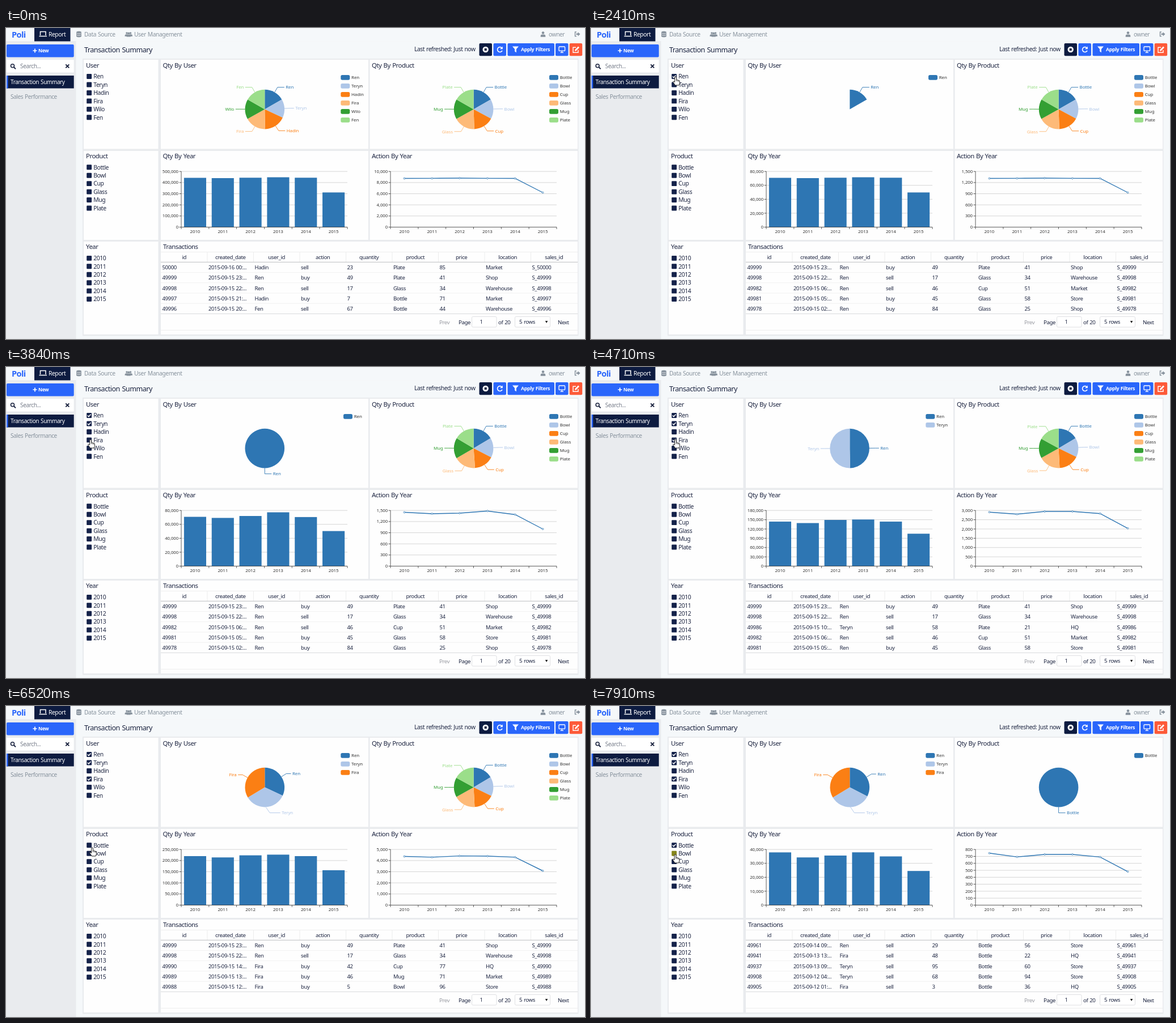
An HTML page that plays this animation: 1021x549 px, repeating every 8000 ms.

```html
<!DOCTYPE html>
<html lang="en">
<head>
<meta charset="utf-8">
<title>Transaction Summary</title>
<style>
html, body { margin: 0; width: 100%; height: 100%; overflow: hidden; background: #f5f8fa; }
svg { display: block; font-family: "Noto Sans", "Open Sans", sans-serif; }
text { letter-spacing: -.041em; word-spacing: .07em; }
.chart text { letter-spacing: -.012em; word-spacing: 0; }
</style>
</head>
<body>
<svg id="stage" width="1021" height="549" viewBox="0 0 1021 549">
  <g id="base"></g><g id="hover"></g><g id="filters"></g>
  <g id="charts" class="chart"></g><g id="rows"></g><g id="cursor"></g>
</svg>
<script>
const LOOP = 8000, HOLD = 35, UPDATE = 300;
const NAVY = '#0d1b40', BLUE = '#2a66fb', INK = '#1c2440', GREY = '#87929d';
const COLORS = ['#2e76b3', '#aec6e8', '#fb7f14', '#fdba78', '#339f33', '#9bde8a'];
const USERS = ['Ren', 'Teryn', 'Hadin', 'Fira', 'Wilo', 'Fen'];
const GOODS = ['Bottle', 'Bowl', 'Cup', 'Glass', 'Mug', 'Plate'];
const YEARS = [2010, 2011, 2012, 2013, 2014, 2015];
const COLUMNS = ['id', 'created_date', 'user_id', 'action', 'quantity', 'product', 'price', 'location', 'sales_id'];

// id, day, hour, user, action, quantity, product, price, location
const SALES = `50000 16 00 Hadin sell 23 Plate 85 Market
49999 15 23 Ren buy 49 Plate 41 Shop
49998 15 22 Ren sell 17 Glass 34 Warehouse
49997 15 21 Hadin buy 7 Bottle 71 Market
49996 15 20 Fen sell 67 Bottle 44 Warehouse
49990 15 14 Fira buy 42 Cup 77 HQ
49989 15 13 Fira buy 46 Mug 71 Market
49988 15 12 Fira buy 5 Bowl 96 Store
49986 15 10 Teryn sell 58 Plate 21 HQ
49982 15 06 Ren sell 46 Cup 51 Market
49981 15 05 Ren buy 45 Glass 58 Store
49978 15 02 Ren buy 84 Glass 25 Shop
49961 14 09 Ren sell 29 Bottle 56 Store
49941 13 13 Fira sell 48 Bottle 22 HQ
49937 13 09 Teryn sell 95 Bottle 60 Store
49908 12 04 Teryn sell 68 Bottle 94 Store
49905 12 01 Fira sell 3 Bottle 36 HQ`.split('\n').map(r => r.split(' '));

// Cuts are sector ends in degrees; bars and line hold the y of each value.
const STATES = [
  { at: 0, users: USERS, userCuts: [60, 115, 179, 241, 300, 360], goods: GOODS, goodCuts: [60, 118, 178, 241, 300, 360],
    barMax: 500000, barSteps: 5, bars: [264.5, 265, 264.3, 263.5, 264.3, 290.3],
    lineMax: 10000, lineSteps: 5, line: [265.5, 265.4, 265, 265.4, 265.5, 290.5] },
  { at: 2405, users: ['Ren'], userCuts: [360], goods: GOODS, goodCuts: [59, 117, 176, 240, 301, 360],
    barMax: 80000, barSteps: 4, bars: [264.5, 266.4, 263, 256.5, 264.9, 289.6],
    lineMax: 1500, lineSteps: 5, line: [256.5, 259, 258, 254.2, 260.5, 286] },
  { at: 4370, users: ['Ren', 'Teryn'], userCuts: [179, 360], goods: GOODS, goodCuts: [59, 116, 177, 241, 299, 360],
    barMax: 180000, barSteps: 6, bars: [272.9, 275.5, 270, 269.2, 272.9, 294.3],
    lineMax: 3000, lineSteps: 6, line: [256.2, 259.8, 255, 255, 258.7, 284.8] },
  { at: 5370, users: ['Ren', 'Teryn', 'Fira'], userCuts: [115, 239, 360], goods: GOODS, goodCuts: [59, 116, 177, 241, 299, 360],
    barMax: 250000, barSteps: 5, bars: [265, 267.3, 263.6, 262.4, 265, 289.9],
    lineMax: 5000, lineSteps: 5, line: [265.5, 266.9, 264.6, 265, 266.9, 291] },
  { at: 7210, users: ['Ren', 'Teryn', 'Fira'], userCuts: [117, 239, 360], goods: ['Bottle'], goodCuts: [360],
    barMax: 40000, barSteps: 4, bars: [258.4, 267.3, 264, 258.3, 265.5, 291.2],
    lineMax: 800, lineSteps: 8, line: [259.8, 266.4, 262, 262, 266.6, 292.4] }
];
const CHECKS = { Ren: 2080, Teryn: 3280, Fira: 4370, Bottle: 6850 };

// time, tip x, tip y
const PATH = [[930, 62, 494], [1340, 97, 116], [1410, 97, 116], [1700, 143, 84], [1750, 143, 83], [1930, 145, 83],
  [2080, 146, 84], [2250, 149, 86], [2440, 149, 86], [2770, 151, 103], [2920, 151, 102], [3280, 151, 102],
  [3840, 149, 128], [5910, 149, 128], [6150, 159, 190], [6380, 153, 249], [6520, 152, 250], [6650, 150, 248],
  [6850, 149, 247], [7210, 149, 247], [7680, 148.5, 262]];

const $ = id => document.getElementById(id);
const mix = (a, b, k) => a + (b - a) * k;
const rect = (x, y, w, h, fill, more = '') => `<rect x="${x}" y="${y}" width="${w}" height="${h}" fill="${fill}" ${more}/>`;
const path = (d, fill, more = '') => `<path d="${d}" fill="${fill}" ${more}/>`;
const stroke = (d, color, w = 1, more = '') => path(d, 'none', `stroke="${color}" stroke-width="${w}" ${more}`);
const dot = (x, y, r, fill, more = '') => `<circle cx="${x}" cy="${y}" r="${r}" fill="${fill}" ${more}/>`;
const text = (x, y, s, size, fill = INK, more = '') =>
  `<text x="${x}" y="${(y + size * .36).toFixed(2)}" font-size="${size}" fill="${fill}" ${more}>${s}</text>`;
const MID = 'text-anchor="middle"', END = 'text-anchor="end"', BOLD = 'font-weight="700"';

function put(id, html) {
  const el = $(id);
  if (el.last !== html) el.innerHTML = el.last = html;
}

function person(x, y, s, c) {
  return dot(x, y - 2.6 * s, 2.4 * s, c) +
    path(`M${x - 4.5 * s} ${y + 5 * s}v${-2 * s}q0 ${-2.6 * s} ${2.6 * s} ${-2.6 * s}h${3.8 * s}q${2.6 * s} 0 ${2.6 * s} ${2.6 * s}v${2 * s}z`, c);
}

function nav() {
  return rect(0, 0, 1021, 23.5, '#f5f8fa') + rect(0, 23, 123.5, 526, '#e9ebee') +
    text(10, 12, 'Poli', 14.6, BLUE, BOLD) + rect(50, 0, 63.5, 23.5, NAVY) +
    stroke('M60.5 13V6.5h9.5V13M58.5 14.6h13.5', '#fff', 1.5) + text(75, 11, 'Report', 10.3, '#fff') +
    path('M124 7.5c0-2.4 9-2.4 9 0v7c0 2.4-9 2.4-9 0z', GREY) +
    stroke('M124 8.5c1 2 8 2 9 0M124 11.6c1 2 8 2 9 0', '#f5f8fa', .8) + text(138, 11, 'Data Source', 10.3, GREY) +
    person(213, 11, .75, GREY) + person(219.5, 11, .75, GREY) + person(216.2, 11.6, .8, GREY) +
    text(226, 11, 'User Management', 10.3, GREY) +
    person(947, 11, .95, GREY) + text(957, 11, 'owner', 10.2, GREY) +
    stroke('M1006 7h-2.5v7.5h2.5', GREY, 1.4) + path('M1005.5 9.6h3v-2.4l4 3.6-4 3.6v-2.4h-3z', GREY);
}

function sidebar() {
  return rect(1, 29, 118.7, 22.5, BLUE, 'rx="2"') + stroke('M47.5 40h7M51 36.5v7', '#fff', 1.7) +
    text(57, 40, 'New', 8.6, '#fff', BOLD) + rect(1, 56, 118.7, 22.5, '#fff', 'rx="1"') +
    dot(11.5, 66.8, 3, 'none', `stroke="${INK}" stroke-width="1.6"`) + stroke('M13.8 69l3.2 3.3', INK, 1.9) +
    text(25, 67.3, 'Search...', 10.1, '#777d8a') + stroke('M105.3 64.4l6 6M111.3 64.4l-6 6', INK, 2) +
    rect(1, 84, 118.7, 22.5, NAVY) + rect(1, 84, 2.5, 22.5, BLUE) + text(8, 95.5, 'Transaction Summary', 10.05, '#fff');
}

function toolbar() {
  const button = (x, w, c) => rect(x, 27, w, 22.3, c, 'rx="2"');
  return text(138, 38.7, 'Transaction Summary', 12.6) + text(720, 37.5, 'Last refreshed: Just now', 10.3) +
    button(834.5, 22.5, NAVY) + dot(845.7, 38, 5.2, '#fff') + rect(843.7, 36, 4, 4, NAVY) +
    button(859.5, 22.5, BLUE) + stroke('M874.3 35.2a4.4 4.4 0 1 0 .7 4.6', '#fff', 1.7) + path('M875.8 32.4v4.8h-4.8z', '#fff') +
    button(884.5, 82.5, BLUE) + path('M893 32.5h11l-4.1 4.8v6l-2.8-2v-4z', '#fff') + text(908, 38, 'Apply Filters', 8.9, '#fff', BOLD) +
    button(969, 22.5, BLUE) + rect(975, 33, 10.6, 7.4, 'none', 'stroke="#fff" stroke-width="1.3" rx="1"') + stroke('M977.5 43.4h5.6M980.3 40v3', '#fff', 1.3) +
    button(993.7, 22.5, '#fd5a38') + stroke('M1005 34.3h-5v9h9v-4.4', '#fff', 1.4) + path('M1003 40.8l.5-2.6 5.5-5.6 2 2-5.4 5.6z', '#fff');
}

function panels() {
  let s = rect(135, 54, 874.5, 489.5, '#e9ebee');
  [[56, 157.5], [217, 157], [377, 164]].forEach(([y, h], i) => {
    s += rect(137, y, 131.5, h, '#fefefe');
    s += i < 2 ? rect(273, y, 366, h, '#fefefe') + rect(641.5, y, 366.5, h, '#fefefe') : rect(273, y, 735, h, '#fefefe');
  });
  const titles = [[141, 65.7, 'User'], [276.5, 65.7, 'Qty By User'], [645, 65.7, 'Qty By Product'], [141, 226.2, 'Product'],
    [276.5, 226.2, 'Qty By Year'], [645, 226.2, 'Action By Year'], [141, 386.4, 'Year'], [277, 386.4, 'Transactions']];
  return s + titles.map(a => text(...a, 11.35)).join('');
}

function tableFrame() {
  let s = stroke('M273 395.5H1008M273 533.5H1008', '#eee');
  COLUMNS.forEach((name, i) => {
    const x = 273.5 + 81.5 * i;
    s += text(x + 40.7, 404.7, name, 9.6, INK, MID);
    if (i) s += stroke(`M${x} 396V413`, '#eceded');
  });
  for (let i = 1; i < 5; i++) s += stroke(`M273 ${413.4 + 18.2 * i}H1008`, '#f1f1f1');
  return s + stroke('M273 413.3H1008', '#c9cacc', 1.2) + stroke('M273 504.5H1008', '#d9dadc') +
    text(764, 519.2, 'Prev', 9.7, '#9a9ca3') + text(798, 519.2, 'Page', 9.7) +
    rect(821.5, 509.5, 43.5, 18.5, '#fff', 'stroke="#dfe0e3" rx="2"') + text(838, 519, '1', 9.4, INK, MID) +
    text(868, 519.2, 'of 20', 9.7) + rect(897.5, 509.5, 62, 18.5, '#fff', 'stroke="#dfe0e3" rx="2"') +
    text(905, 519, '5 rows', 9.7) + path('M950.8 517h4.6l-2.3 4z', '#222') + text(973, 519.2, 'Next', 9.7);
}

function filterList(names, y0, t) {
  return names.map((name, i) => {
    const y = y0 + 14.45 * i, hot = name === 'Bowl' && t >= 7910;
    return rect(142.2, y - 4.4, 8.9, 8.9, hot ? '#86861c' : '#14224a', 'rx="1.2"') +
      (t >= CHECKS[name] ? stroke(`M143.8 ${y}l2 2.1 3.8-4`, '#fff', 1.5) : '') + text(154.3, y + .1, name, 10.4);
  }).join('');
}

function labelSpot(cx, mid, shift) {
  const a = mid * Math.PI / 180, sx = Math.sin(a), dir = sx >= -1e-9 ? 1 : -1;
  const gap = 14.5 - 5.5 * Math.max(0, 2 * Math.abs(sx) - 1);
  const ex = cx + 45 * sx + shift / 2, y = 143.6 - 45 * Math.cos(a);
  return { ex, y, tx: cx + 45 * sx + dir * gap + shift, dir };
}

function sectors(names, cuts, cx) {
  return names.map((name, i) => {
    const from = i ? cuts[i - 1] : 0, to = cuts[i];
    const crowded = names.length === 3 && i === 1;
    return { name, from, to, spot: labelSpot(cx, (from + to) / 2, crowded ? 13 : 0) };
  });
}

function pie(cx, before, after, k, legendX) {
  const r = 34.8, cy = 143.6;
  const at = deg => {
    const a = deg * Math.PI / 180;
    return `${(cx + r * Math.sin(a)).toFixed(2)} ${(cy - r * Math.cos(a)).toFixed(2)}`;
  };
  let s = '', labels = '';
  after.forEach((b, i) => {
    const a = before.find(o => o.name === b.name) || { from: b.from, to: b.from, spot: b.spot };
    const from = mix(a.from, b.from, k), to = Math.min(mix(a.to, b.to, k), from + 359.99);
    const c = COLORS[i], p = b.spot, y = mix(a.spot.y, p.y, k);
    const ex = mix(a.spot.ex, p.ex, k), tx = mix(a.spot.tx, p.tx, k);
    s += path(`M${cx} ${cy}L${at(from)}A${r} ${r} 0 ${to - from > 180 ? 1 : 0} 1 ${at(to)}Z`, c);
    labels += stroke(`M${at((from + to) / 2)}L${ex} ${y}L${tx - 2.5 * p.dir} ${y}`, c, .9) +
      text(tx, y, b.name, 7.9, c, p.dir < 0 ? END : '');
    const ly = 87.4 + 15 * i;
    labels += rect(legendX, ly - 4.3, 16, 8.6, c, 'rx="2.6"') + text(legendX + 18.8, ly - .3, b.name, 7.9, '#333');
  });
  return s + labels;
}

function axes(x0, max, steps) {
  let s = '';
  for (let i = 0; i <= steps; i++) {
    const y = 351.5 - 98.3 * i / steps;
    if (i) s += stroke(`M${x0} ${y}h293`, '#ccc', .8);
    s += stroke(`M${x0 - 3.5} ${y}h3.5`, '#333', .8) +
      text(x0 - 5, y - .2, (max * i / steps).toLocaleString('en-US'), 7.8, '#333', END);
  }
  YEARS.forEach((year, i) => s += text(x0 + 48.83 * (i + .5), 359.4, year, 7.9, '#333', MID));
  return s;
}

function axisLines(x0) {
  let d = `M${x0} 253V351.5H${x0 + 293}`;
  for (let i = 0; i < 7; i++) d += `M${x0 + 48.83 * i} 351.5v3.5`;
  return stroke(d, '#333', .8);
}

function charts(a, b, k) {
  const tops = b.bars.map((y, i) => mix(a.bars[i], y, k));
  const pts = b.line.map((y, i) => [702.4 + 48.83 * i, mix(a.line[i], y, k)]);
  return pie(456.3, sectors(a.users, a.userCuts, 456.3), sectors(b.users, b.userCuts, 456.3), k, b.users.length > 1 ? 590.3 : 595) +
    pie(824.6, sectors(a.goods, a.goodCuts, 824.6), sectors(b.goods, b.goodCuts, 824.6), k, 958) +
    axes(309, b.barMax, b.barSteps) +
    tops.map((y, i) => rect(313.9 + 48.83 * i, y, 39.1, 351.5 - y, COLORS[0])).join('') + axisLines(309) +
    axes(678, b.lineMax, b.lineSteps) + axisLines(678) + stroke('M' + pts.join('L'), COLORS[0], 1.4) +
    pts.map(([x, y]) => dot(x, y, 1.4, '#fff', `stroke="${COLORS[0]}" stroke-width=".8"`)).join('');
}

function rows({ users, goods }) {
  return SALES.filter(r => users.includes(r[3]) && goods.includes(r[6])).slice(0, 5).map((r, i) => {
    const [id, day, hour, ...rest] = r;
    return [id, `2015-09-${day} ${hour}:...`, ...rest, 'S_' + id]
      .map((cell, j) => text(275.5 + 81.5 * j, 422.7 + 18.2 * i, cell, 9.5)).join('');
  }).join('');
}

function tipAt(t) {
  if (t < PATH[0][0]) return null;
  const n = PATH.findIndex(p => p[0] > t);
  if (n < 0) return PATH[PATH.length - 1].slice(1);
  const [t0, x0, y0] = PATH[n - 1], [t1, x1, y1] = PATH[n];
  let k = (t - t0) / (t1 - t0);
  k = k * k * (3 - 2 * k);
  return [mix(x0, x1, k), mix(y0, y1, k)];
}

const HAND = 'M-1.4 .8Q0-.7 1.4 .8V5.4Q2.9 4.6 3.6 5.9Q5 5.4 5.6 6.7Q7.3 6.4 7.4 8.2V11.2Q7.2 13 6 15H-.8Q-2 12.4-4.2 9.8Q-4.8 8.2-3 8.2L-1.4 9.6Z';
const ARROW = 'M0 0V12.5L2.9 9.8 4.9 14.4 6.9 13.5 4.9 9.1H9Z';

function cursor(tip, overLink) {
  if (!tip) return '';
  const grooves = overLink ? stroke('M1.4 5.4V8M3.6 6V8.4M5.6 6.8V8.8', '#222', .8) : '';
  return `<g transform="translate(${tip[0].toFixed(2)} ${tip[1].toFixed(2)})">` +
    path(overLink ? HAND : ARROW, '#fff', 'stroke="#222" stroke-width="1" stroke-linejoin="round"') + grooves + '</g>';
}

function draw(t) {
  const n = STATES.filter(s => s.at <= t).length - 1;
  const now = STATES[n], was = STATES[Math.max(0, n - 1)];
  // New scales and rows appear at once; shapes ease over after a short hold.
  const p = Math.max(0, Math.min(1, (t - now.at - HOLD) / UPDATE));
  const tip = tipAt(t);
  const onItem = tip && tip[0] < 119 && tip[1] > 110 && tip[1] < 132;
  const onMenu = tip && tip[0] < 119 && tip[1] > 84 && tip[1] < 132;
  const onFilter = tip && tip[0] > 140 && (tip[1] < 165 || tip[1] > 238);
  put('hover', (onItem ? rect(1, 110, 118.7, 22.5, '#c0c4cc') + rect(1, 110, 2.5, 22.5, BLUE) : '') +
    text(8, 121.3, 'Sales Performance', 10.05, GREY));
  put('filters', filterList(USERS, 85.5, t) + filterList(GOODS, 245.7, t) + filterList(YEARS, 406.3, t));
  put('charts', charts(was, now, 1 - (1 - p) ** 3));
  put('rows', rows(now));
  put('cursor', cursor(tip, onMenu || onFilter));
}

put('base', nav() + sidebar() + toolbar() + panels() + tableFrame());
const start = performance.now();
function tick() {
  draw((performance.now() - start) % LOOP);
  requestAnimationFrame(tick);
}
tick();
</script>
</body>
</html>
```
